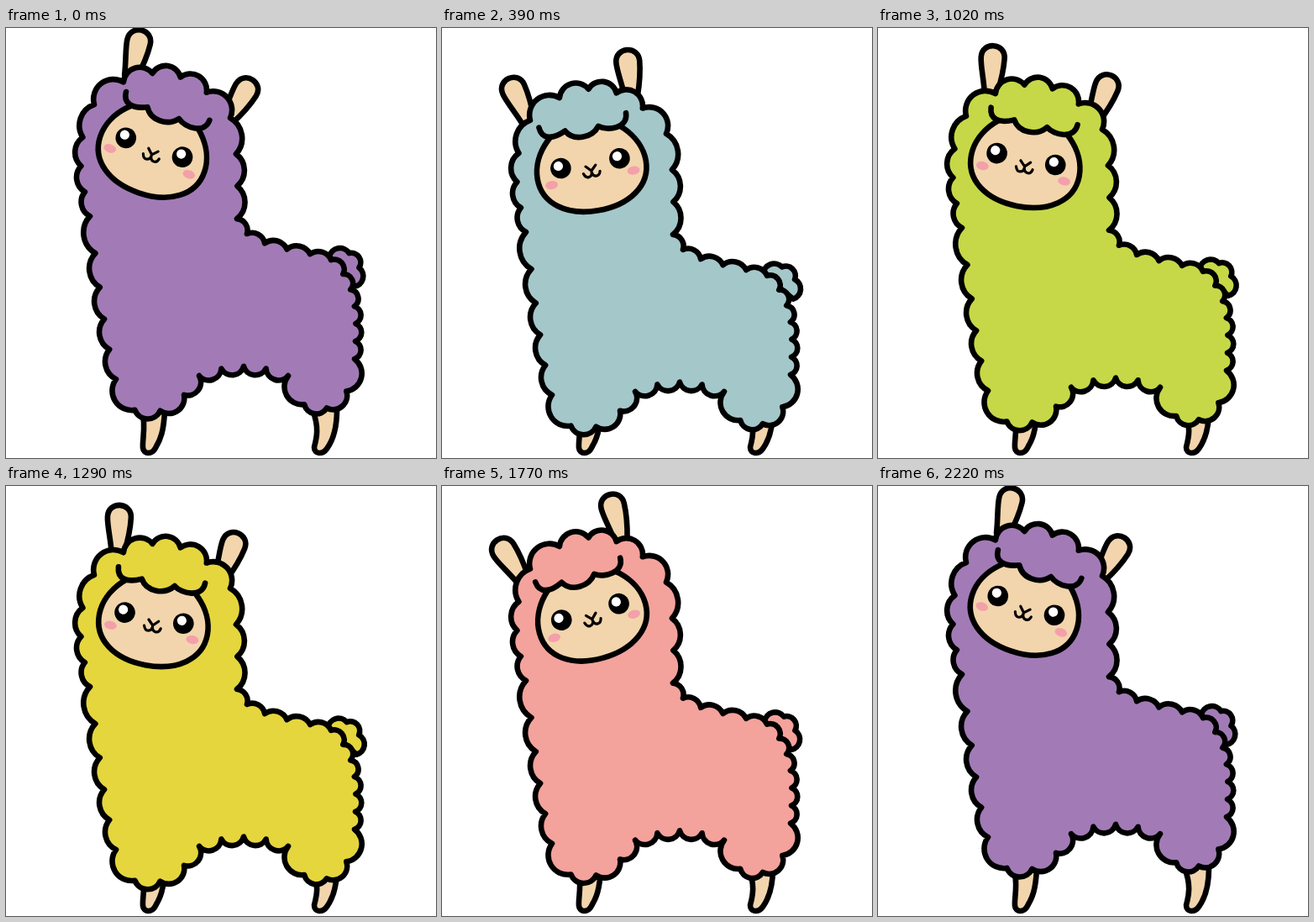
Write an HTML page that moves like this. It is 512 px wide and 512 px high and loops after 2250 ms.

```html
<!DOCTYPE html>
<html lang="en">
<head>
<meta charset="utf-8">
<title>Dancing alpaca</title>
<style>
  html, body { margin: 0; height: 100%; overflow: hidden; background: #fff; }
  svg { display: block; width: 100vw; height: 100vh; }
  .line { stroke: #000; stroke-width: 6.6; stroke-linecap: round; stroke-linejoin: round; }
  .skin { fill: #f2d5ac; }
  .wool { fill: currentColor; }
  .none { fill: none; }
  .blush { fill: #f4a0aa; }
</style>
</head>
<body>
<svg id="stage" viewBox="0 0 512 512">
  <defs>
    <path id="ear" class="line skin" d="M-7 36C-9 20-14 4-14-6C-14-25 14-25 14-6C14 4 12 20 8 36"/>
    <g id="eye"><circle r="12.3"/><circle cx="-2.5" cy="-3" r="5.6" fill="#fff"/></g>
    <path id="fringe" d="M-53-52C-52-38-40-35-23-43C-15-29 7-29 17-42C27-34 52-34 52-52"/>
  </defs>
  <g class="line skin">
    <path d="M162 455C167 475 162 490 163 500C164 508 174 508 178 500C184 490 188 480 189 455"/>
    <path d="M365 455C373 475 370 488 367 499C367 508 377 508 382 501C390 490 394 475 394 455"/>
  </g>
  <g id="bob">
    <path id="tail" class="line wool"/>
    <g id="ears">
      <use href="#ear" transform="translate(-69 -100) rotate(-11)"/>
      <use href="#ear" transform="translate(69 -102) rotate(8)"/>
    </g>
    <path id="body" class="line wool"/>
    <g id="face">
      <path class="line skin" d="M-65 8C-65-22-36-54 0-54S66-22 66 8C66 38 38 57 0 57S-65 38-65 8"/>
      <path class="wool" d="M-53-52Q0-80 52-52V-44H-53"/>
      <use href="#fringe" class="line wool"/>
      <use href="#eye" x="-35.5"/>
      <use href="#eye" x="35.5"/>
      <ellipse class="blush" cx="-49.5" cy="18" rx="7.5" ry="5"/>
      <ellipse class="blush" cx="49.5" cy="17" rx="7.5" ry="5"/>
      <path class="line none" style="stroke-width:3.2" d="M-6 3L0 9L6 3M0 9V12M-10 11Q-8 17-4 16Q0 15 0 11Q1 16 5 16Q9 16 10 11"/>
    </g>
  </g>
</svg>
<script>
const el = id => document.getElementById(id);
const FRAME = 30, FRAMES = 75;

// A woolly outline: each run follows a Bezier curve, cut into equal bumps.
function wool(x, y) {
  let px = x, py = y, path = `M${x} ${y}`;
  const outline = {
    run(bumps, roundness, x1, y1, x2, y2, x3, y3) {
      const [x0, y0] = [px, py];
      const at = (t, a, b, c, d, s = 1 - t) =>
        s * s * s * a + 3 * s * s * t * b + 3 * s * t * t * c + t * t * t * d;
      for (let i = 1; i <= bumps; i++) {
        const nx = at(i / bumps, x0, x1, x2, x3), ny = at(i / bumps, y0, y1, y2, y3);
        const r = roundness * Math.hypot(nx - px, ny - py);
        path += `A${r} ${r} 0 0 1 ${nx} ${ny}`;
        [px, py] = [nx, ny];
      }
      return outline;
    },
    drawOn(id) { el(id).setAttribute("d", path + "Z"); }
  };
  return outline;
}

const FULL = .54, FLAT = .64;
wool(105, 91)
  .run(5, FULL, 163, 32, 223, 47, 267, 107)    // crown
  .run(3, FLAT, 278, 154, 275, 186, 275, 227)  // nape
  .run(5, FLAT, 285, 264, 350, 262, 387, 276)  // back
  .run(6, FULL, 422, 308, 417, 352, 415, 394)  // rump
  .run(4, FULL, 416, 455, 352, 482, 336, 414)  // hind leg
  .run(4, FULL, 301, 399, 265, 399, 230, 414)  // belly
  .run(4, FULL, 217, 440, 152, 498, 131, 418)  // front leg
  .run(5, FLAT, 116, 359, 112, 301, 100, 224)  // chest
  .run(4, FLAT, 93, 186, 77, 147, 105, 91)     // throat
  .drawOn("body");
wool(385, 272).run(3, FULL, 412, 252, 432, 288, 414, 308).drawOn("tail");

const colours = [
  [162, 123, 182], [164, 198, 206], [173, 208, 138],
  [206, 219, 50], [253, 209, 74], [242, 149, 178]
];

function woolColour(frame) {
  const pos = frame / (FRAMES - 1) * colours.length, i = Math.floor(pos);
  const from = colours[i % colours.length], to = colours[(i + 1) % colours.length];
  return from.map((c, k) => Math.round(c + (to[k] - c) * (pos - i)));
}

// Frames where the body is highest, leaning right and left in turn.
const beats = [-.5, 19, 38.6, 56.2, 74.5];

function pose(frame) {
  const i = beats.findLastIndex(beat => beat <= frame);
  const u = (frame - beats[i]) / (beats[i + 1] - beats[i]);
  const swing = .7 * (1 - 2 * u) + .3 * Math.cos(Math.PI * u);
  return {
    drop: 26 * Math.sin(Math.PI * u) ** 1.5 - .5,
    tilt: 20.2 * swing * (i % 2 ? -1 : 1) - .7
  };
}

function draw(now) {
  const frame = Math.floor(now / FRAME) % FRAMES;
  const { drop, tilt } = pose(frame);
  const set = (id, transform) => el(id).setAttribute("transform", transform);
  el("stage").style.color = `rgb(${woolColour(frame)})`;
  set("bob", `translate(0 ${drop})`);
  set("tail", `rotate(${-.6 * drop} 395 285)`);
  set("ears", `translate(177 142) rotate(${1.33 * tilt})`);
  set("face", `translate(176.4 142.2) rotate(${tilt})`);
}

const start = performance.now();
function loop() {
  draw(performance.now() - start);
  requestAnimationFrame(loop);
}
loop();
</script>
</body>
</html>
```
